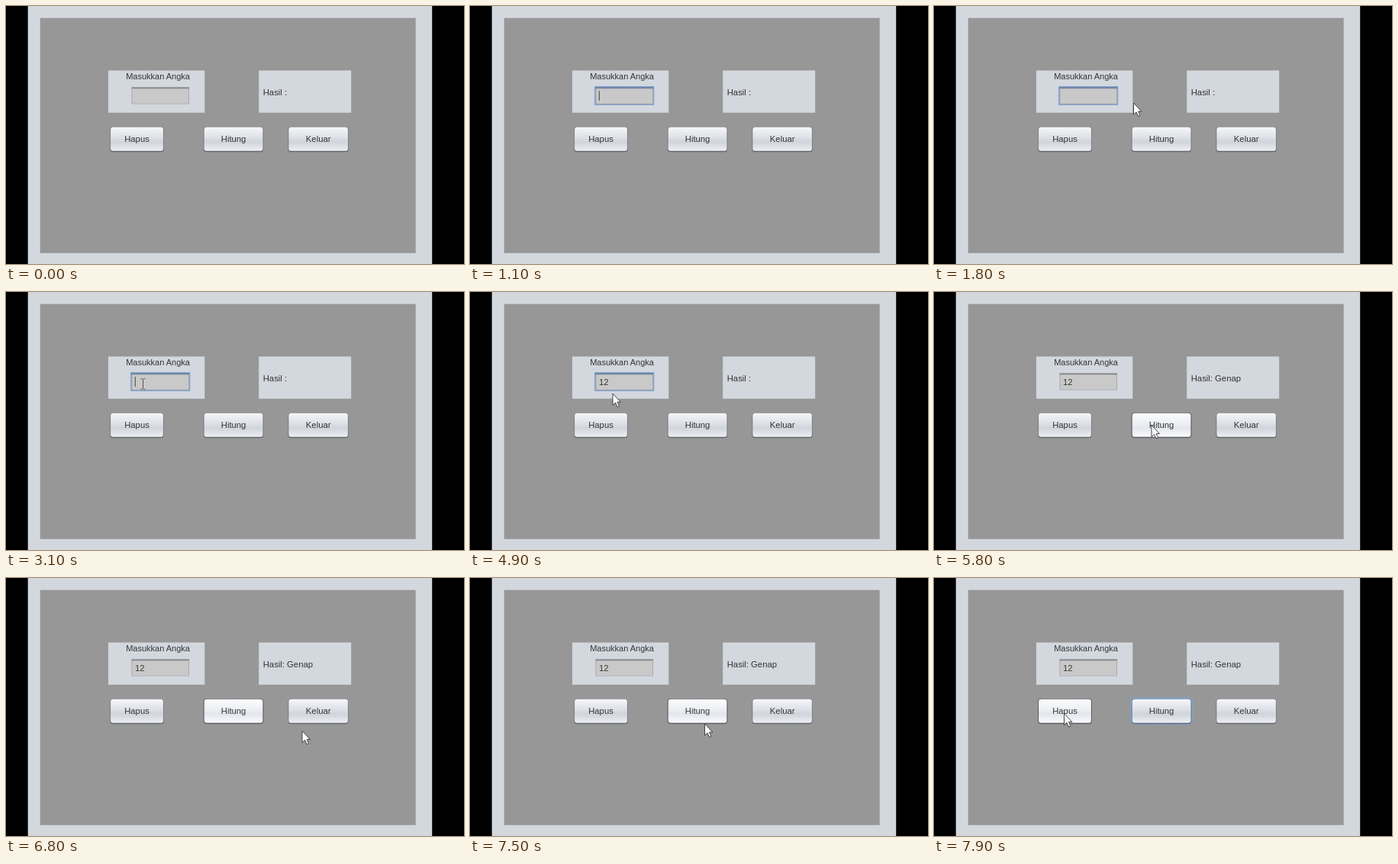
An HTML page for the animation above (8 s loop, 600 px wide and 338 px high).

```html
<!DOCTYPE html>
<html lang="id">
<head>
<meta charset="utf-8">
<title>Ganjil Genap</title>
<style>
  html, body { margin: 0; width: 100%; height: 100%; overflow: hidden; background: #000; }
  svg { display: block; width: 100vw; height: 100vh; }
  text { font: 11.3px "Liberation Sans", Arial, sans-serif; fill: #343633; }
  .panel { fill: #d3d7de; }
  .edge { fill: #85888e; }
  .shade { fill: #5b5e64; }
  .face { fill: url(#normal); }
  .ring { fill: #85a4cb; visibility: hidden; }
  .hover .face { fill: url(#hover); }
  .hover .edge { fill: #5a5d63; }
  .pressed .face { fill: url(#pressed); }
  .focus .ring { visibility: visible; }
  .focus .edge { fill: #66809f; }
</style>
</head>
<body>
<svg viewBox="0 0 600 338" preserveAspectRatio="none">
  <defs>
    <linearGradient id="normal" x2="0" y2="1">
      <stop offset="0" stop-color="#f5f6f8"/><stop offset=".45" stop-color="#dde0e6"/>
      <stop offset=".62" stop-color="#d0d4db"/><stop offset="1" stop-color="#eceef2"/>
    </linearGradient>
    <linearGradient id="hover" x2="0" y2="1">
      <stop offset="0" stop-color="#fdfdfe"/><stop offset=".45" stop-color="#eceef3"/>
      <stop offset=".62" stop-color="#e3e6ec"/><stop offset="1" stop-color="#fafbfd"/>
    </linearGradient>
    <linearGradient id="pressed" x2="0" y2="1">
      <stop offset="0" stop-color="#8c98a8"/><stop offset=".5" stop-color="#a3afbe"/>
      <stop offset="1" stop-color="#bac4d0"/>
    </linearGradient>
  </defs>

  <rect width="600" height="338"/>
  <rect class="panel" x="28.7" width="529.5" height="338"/>
  <rect x="44.7" y="15.7" width="492" height="308" fill="#979797"/>
  <rect class="panel" x="134" y="84.5" width="126.3" height="55.3"/>
  <rect class="panel" x="331.2" y="84.5" width="121" height="55.3"/>
  <text x="157.2" y="96.3" style="font-size:11px">Masukkan Angka</text>
  <text id="result" x="336.7" y="117"></text>

  <g id="field">
    <rect class="ring" x="163" y="105" width="78.3" height="25" rx="1"/>
    <rect x="164.5" y="106.5" width="75.5" height="22" fill="#a6a8ab"/>
    <rect x="165.5" y="107" width="73.5" height="20.8" fill="#c9c9c9"/>
    <rect x="164.5" y="106.5" width="75.5" height="1.8" fill="#85878b"/>
    <rect class="ring" x="164" y="106" width="76.5" height="2" style="fill:#7088a8"/>
    <text id="value" x="169" y="121.7"></text>
    <rect id="caret" y="111" width="1" height="13" fill="#444"/>
  </g>

  <g id="buttons"></g>

  <path id="arrow" d="M0 0V15.2L3.5 12L6 17.6L8.5 16.5L6 11.1H10.4Z"
        fill="#fff" stroke="#333" stroke-width=".9" stroke-linejoin="round"/>
  <path id="beam" d="M-3 -6.8H-.8L0 -6L.8 -6.8H3M0 -6V6M-3 6.8H-.8L0 6L.8 6.8H3"
        fill="none" stroke="#555"/>
</svg>
<script>
const LOOP = 8000, STEP = 100, BLINK = 500;
const FOCUS = 1100, TYPE = 3800, PRESS = 5500, RELEASE = 5800;
const el = id => document.getElementById(id);

function addButton(id, label, x, width) {
  el("buttons").insertAdjacentHTML("beforeend", `<g id="${id}">
    <rect class="ring" x="${x - 1.6}" y="156.6" width="${width + 3.2}" height="35.6" rx="5"/>
    <rect class="shade" x="${x}" y="160" width="${width}" height="31.2" rx="4"/>
    <rect class="edge" x="${x}" y="158" width="${width}" height="32.3" rx="4"/>
    <rect class="face" x="${x + .9}" y="158.8" width="${width - 1.8}" height="31" rx="3.4"/>
    <text x="${x + width / 2}" y="178.3" text-anchor="middle">${label}</text></g>`);
}
addButton("clear", "Hapus", 136.2, 70.6);
addButton("count", "Hitung", 258.8, 78.5);
addButton("quit", "Keluar", 369.5, 79.3);

const smooth = k => k * k * (3 - 2 * k);
const easeOut = k => 1 - (1 - k) ** 2;

// The pointer sweeps along curves and rests at the end of each one.
const glides = [
  { start: 1400, end: 1600, from: [500, 23], bend: [474, 44], to: [445, 65], ease: smooth },
  { start: 1800, end: 2400, from: [261.5, 127], bend: [205, 150], to: [179.5, 120.5], ease: easeOut },
  { start: 4900, end: 5300, from: [187, 133], bend: [235, 160], to: [285, 174.5], ease: smooth },
  { start: 6200, end: 6800, from: [285, 174.5], bend: [330, 190], to: [388, 200.3], ease: smooth },
  { start: 7200, end: 7900, from: [388, 200.3], bend: [290, 188], to: [170.5, 177.5], ease: smooth }
];

function pointerAt(t) {
  const glide = glides.findLast(g => g.start <= t);
  if (!glide) return null;
  const { start, end, from, bend, to, ease } = glide;
  const k = ease(Math.min(1, (t - start) / (end - start)));
  return from.map((a, i) => (1 - k) ** 2 * a + 2 * k * (1 - k) * bend[i] + k * k * to[i]);
}

const inField = ([x, y]) => x > 164 && x < 240 && y > 106 && y < 129;
const show = (id, on) => el(id).style.visibility = on ? "visible" : "hidden";
const state = (id, names) => el(id).setAttribute("class", names);

function countState(t) {
  if (t < 5200) return "";
  if (t < PRESS) return "hover";
  if (t < RELEASE) return "pressed focus";
  return t < 7600 ? "hover" : "focus";
}

function caretOn(t) {
  const since = t < TYPE ? FOCUS : TYPE + 200; // typing restarts the blink
  return Math.floor(Math.max(0, t - since) / BLINK) % 2 === 0;
}

function draw(t) {
  const focused = t >= FOCUS && t < PRESS;
  const typed = Math.max(0, Math.floor((t - TYPE) / STEP) + 1);
  const value = "12".slice(0, typed);
  el("value").textContent = value;
  el("caret").setAttribute("x", 168.8 + value.length * 6.3);
  el("result").textContent = t < RELEASE ? "Hasil :" : "Hasil: Genap";
  show("caret", focused && caretOn(t));
  state("field", focused ? "focus" : "");
  state("count", countState(t));
  state("clear", t >= 7800 ? "hover" : "");

  const pointer = pointerAt(t);
  const shape = pointer && (inField(pointer) ? "beam" : "arrow");
  for (const id of ["arrow", "beam"]) show(id, id === shape);
  if (shape) el(shape).setAttribute("transform", `translate(${pointer})`);
}

const begin = performance.now();
function tick() {
  const t = (performance.now() - begin) % LOOP;
  draw(Math.floor(t / STEP) * STEP);
  requestAnimationFrame(tick);
}
tick();
</script>
</body>
</html>
```
